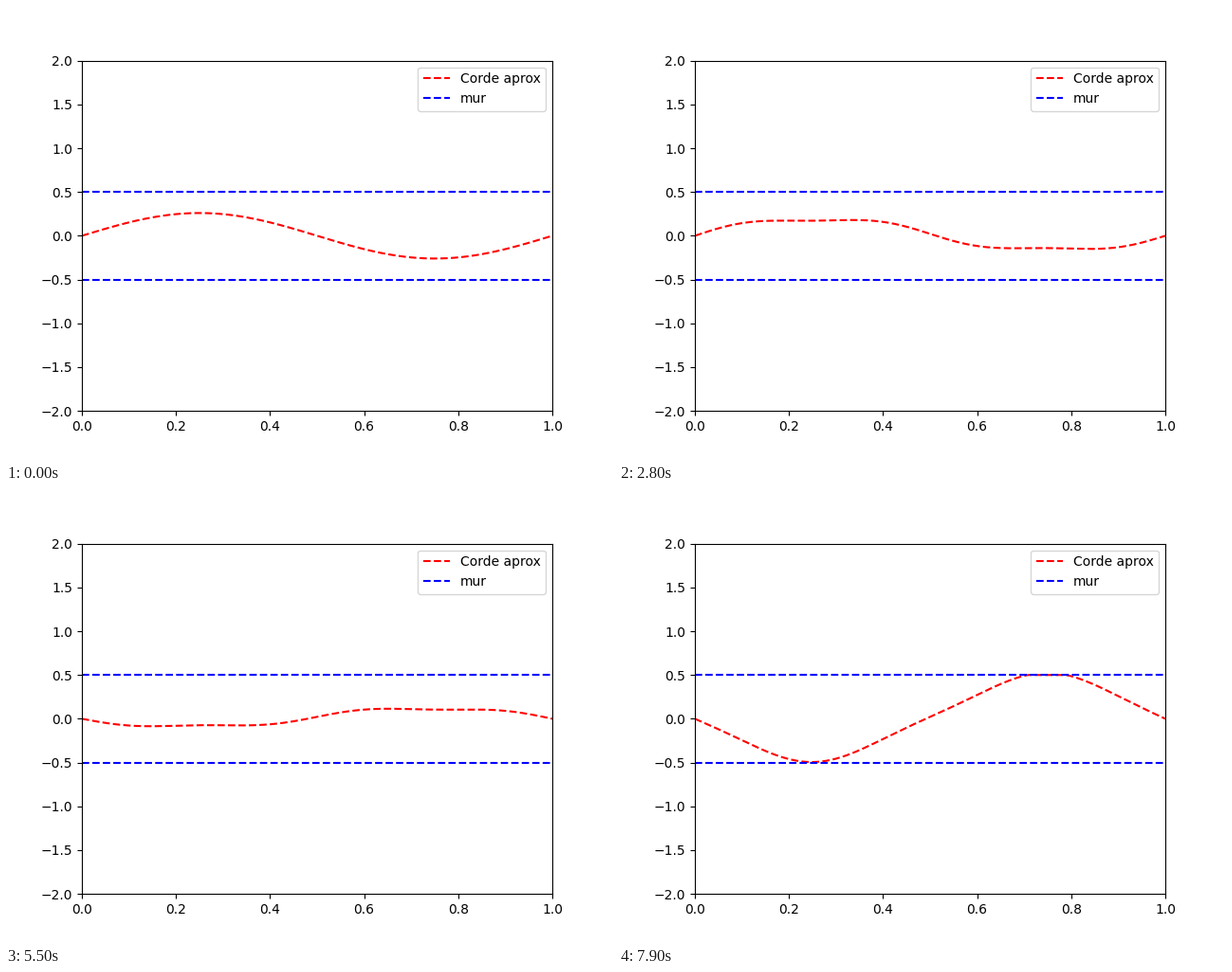
Write a matplotlib script that moves like this. It is 640 by 480 pixels and loops after 8 s.

```python
import numpy as np
import matplotlib.pyplot as plt
from matplotlib.animation import FuncAnimation

FRAMES, INTERVAL = 80, 100
WALL = 0.5
HALF_SWING = 15     # steps from one wall to the other
FIRST_HIT = 3.6     # step at which the string first meets the wall

x = np.linspace(0, 1, 201)


def mode(k):
    return np.sin(k * np.pi * x)


def height(t):
    """String between the walls: main swing plus overtones set off by the bounce."""
    calm = np.exp(-t / 2)
    phase = np.pi * (t - FIRST_HIT) / HALF_SWING - 0.245 * calm
    swing = 0.48 * np.cos(phase) * mode(2)
    overtone = -0.032 * np.cos(3 * phase) * mode(6)
    lift = 0.022 * mode(1)
    return np.clip(swing + (1 - calm) * (overtone + lift), -WALL, WALL)


fig, ax = plt.subplots(figsize=(6.4, 4.8), dpi=100)
ax.set_xlim(0, 1)
ax.set_ylim(-2, 2)
string, = ax.plot(x, height(0), "r--", label="Corde aprox")
ax.plot([0, 1], [WALL, WALL], "b--", label="mur")
ax.plot([0, 1], [-WALL, -WALL], "b--")
ax.legend(loc="upper right")


def update(i):
    string.set_ydata(height(i))
    return string,


anim = FuncAnimation(fig, update, frames=FRAMES, interval=INTERVAL,
                     repeat=True, repeat_delay=0)
plt.show()
```
